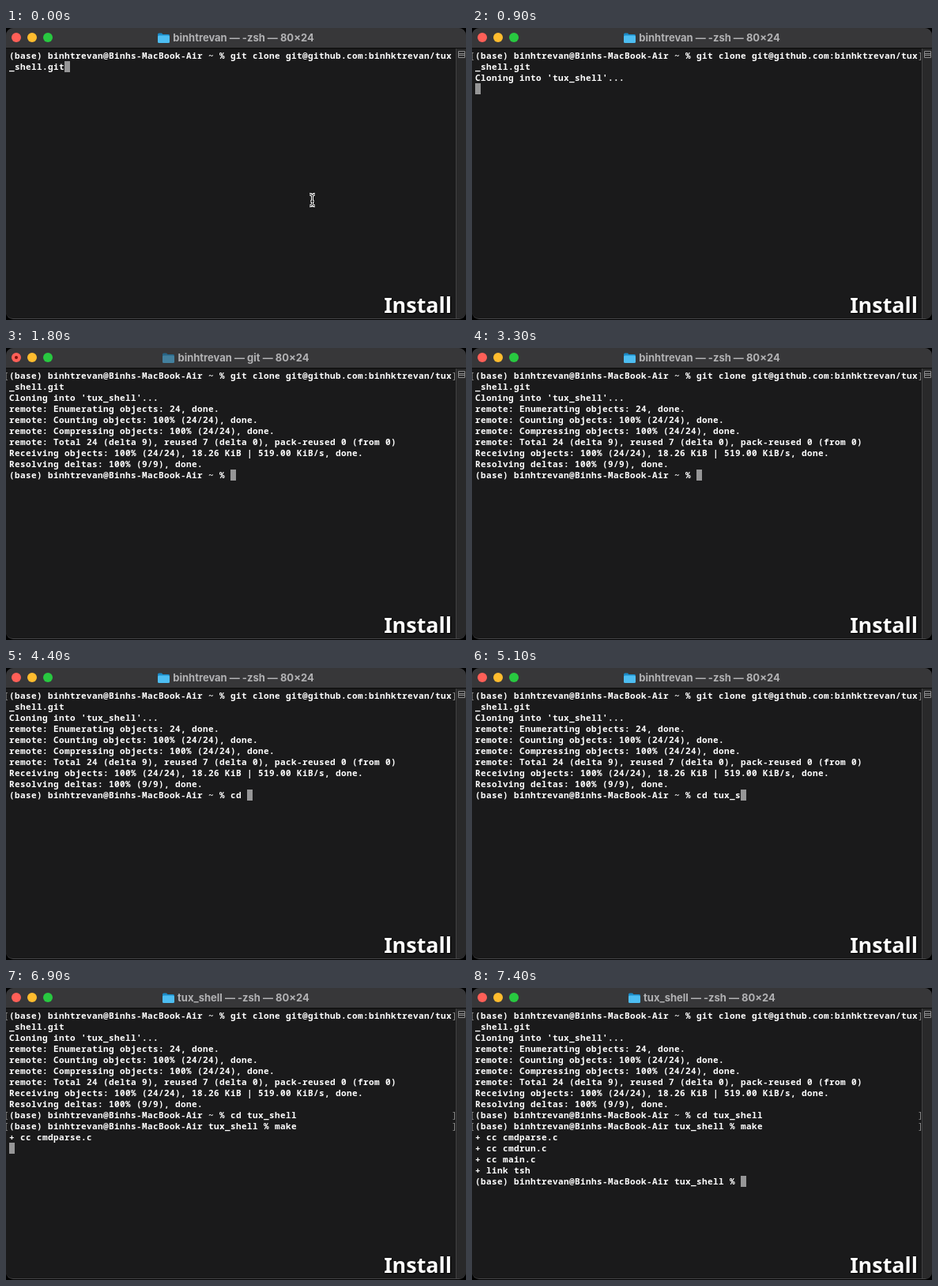
An HTML page that plays this animation: 582 px wide and 370 px high, repeating every 8 s.

```html
<!DOCTYPE html>
<html lang="en">
<head>
<meta charset="utf-8">
<title>Terminal install</title>
<style>
  html, body { margin: 0; width: 100%; height: 100%; overflow: hidden; background: #000; }
  #stage { position: relative; width: 582px; height: 370px; overflow: hidden; }
  #stage > * { position: absolute; }
  #window { left: 0; top: 0; width: 582px; height: 369px; box-sizing: border-box; overflow: hidden;
    background: #1a1a1b; border-radius: 9px; border-bottom: 1px solid #464648; }
  #bar { width: 100%; height: 25px; background: #373739; border-bottom: 1px solid #0c0c0c; }
  #scroll { position: absolute; left: 569px; top: 26px; width: 13px; height: 343px; box-sizing: border-box;
    background: #29292a; border-left: 1px solid #414142; }
  #title { left: 67px; right: 67px; top: 0; height: 24px; display: flex; align-items: center;
    justify-content: safe center; gap: 4px; white-space: nowrap; color: #b2b2b4;
    font: 700 13px/24px Inter, sans-serif; }
  #title svg { flex: none; }
  #screen { left: 4px; top: 28px; margin: 0; color: #fff; letter-spacing: .4px;
    font: 600 11px/14px "Noto Sans Mono", monospace; font-variant-ligatures: none; }
  #screen div { position: relative; height: 14px; }
  .mark { position: absolute; color: #8f8f8f; font-weight: 400; }
  #cursor { width: 7px; height: 14px; background: #969697; }
  #caption { right: 18px; bottom: 6px; color: #fff; line-height: 26px; white-space: nowrap;
    font-family: "Noto Sans", "Open Sans", sans-serif; font-size: 36px; font-weight: 900;
    font-stretch: extra-condensed; text-shadow: 0 0 2px #000, 1px 1px 1px #000; }
</style>
</head>
<body>
<div id="stage">
  <div id="window"><div id="bar"></div><div id="scroll"></div></div>
  <svg width="582" height="370">
    <circle cx="13" cy="12" r="6" fill="#ff5f57"/>
    <circle id="busy" cx="13" cy="12" r="2" fill="#7e120c"/>
    <circle cx="33" cy="12" r="6" fill="#febc2e"/>
    <circle cx="53" cy="12" r="6" fill="#28c840"/>
    <path d="M572.5 29.5h8v8h-8zM573 32.5h7M573 34.5h7" fill="none" stroke="#8b8b8c"/>
  </svg>
  <div id="title">
    <svg id="folder" width="15" height="13">
      <path d="M0 2Q0 .5 1.5 .5H5L6.5 2H13.5Q15 2 15 3.5V6H0z" fill="#1b8ac6"/>
      <rect y="3.5" width="15" height="9.5" rx="1.5" fill="#4dbdf2"/>
    </svg>
    <span id="name"></span>
  </div>
  <pre id="screen"></pre>
  <div id="cursor"></div>
  <svg id="pointer" width="582" height="370" fill="none">
    <g id="beam"><path id="beamPath" d="M384 210.5q3.5 0 3.5 3v9q0 3-3.5 3M391 210.5q-3.5 0-3.5 3v9q0 3 3.5 3M385.5 219.5h4" stroke="#fff" stroke-width="3"/>
    <use href="#beamPath"/></g>
    <path d="M384 210.5q3.5 0 3.5 3v9q0 3-3.5 3M391 210.5q-3.5 0-3.5 3v9q0 3 3.5 3M385.5 219.5h4" stroke="#111"/>
  </svg>
  <div id="caption">Install</div>
</div>
<script>
const LOOP = 8000, COLUMN = 7, ROW = 14;
const $ = id => document.getElementById(id);
const user = 'binhtrevan';
const repo = 'git@github.com:binhktrevan/tux_shell.git';
const prompt = dir => `(base) ${user}@Binhs-MacBook-Air ${dir} % `;

// Each entry is the time at which one more character is visible.
const cdKeys = [4100, 4200, 4400, 4500, 4500, 4700, 4800, 5100, 5200, 5300, 5500, 5700];
const makeKeys = [6300, 6400, 6500, 6600];
const typed = (text, keys, t) => text.slice(0, keys.filter(k => k <= t).length);

const output = [
  [900, "Cloning into 'tux_shell'..."],
  [1700, 'remote: Enumerating objects: 24, done.'],
  [1700, 'remote: Counting objects: 100% (24/24), done.'],
  [1700, 'remote: Compressing objects: 100% (24/24), done.'],
  [1700, 'remote: Total 24 (delta 9), reused 7 (delta 0), pack-reused 0 (from 0)'],
  [1800, 'Receiving objects: 100% (24/24), 18.26 KiB | 519.00 KiB/s, done.'],
  [1800, 'Resolving deltas: 100% (9/9), done.'],
  [1800, t => prompt('~') + typed('cd tux_shell', cdKeys, t), 5900],
  [5900, t => prompt('tux_shell') + typed('make', makeKeys, t), 6900],
  [6900, '+ cc cmdparse.c'],
  [7000, '+ cc cmdrun.c'],
  [7100, '+ cc main.c'],
  [7200, '+ link tsh'],
  [7300, () => prompt('tux_shell')]
];

// start, title, whether a command is running
const titles = [
  [0, `${user} — -zsh — 80×24`, false],
  [1000, `${user} — ssh ◂ git clone ${repo} — 80…`, true],
  [1800, `${user} — git — 80×24`, true],
  [1900, `${user} — -zsh — 80×24`, false],
  [5900, 'tux_shell — -zsh — 80×24', false],
  [7000, 'tux_shell — make — 80×24', true],
  [7300, 'tux_shell — -zsh — 80×24', false]
];

function screenLines(t) {
  const command = prompt('~') + 'git clone ' + repo;
  const lines = [
    { text: command.slice(0, 80), marked: t >= 900 },
    { text: command.slice(80) }
  ];
  for (const [start, text, entered = Infinity] of output) {
    if (t >= start) lines.push({ text: typeof text === 'function' ? text(t) : text, marked: t >= entered });
  }
  return lines;
}

function lineHtml({ text, marked }) {
  const mark = (char, column) => `<span class="mark" style="left:${column * COLUMN}px">${char}</span>`;
  return `<div>${marked ? mark('[', -1) + mark(']', 80) : ''}${text}</div>`;
}

function waitingAtLineEnd(t) {
  return t < 900 || (t >= 1800 && t < 6900) || t >= 7300;
}

function draw(t) {
  const lines = screenLines(t);
  const atEnd = waitingAtLineEnd(t);
  const row = atEnd ? lines.length - 1 : lines.length;
  const column = atEnd ? lines[row].text.length : 0;
  $('screen').innerHTML = lines.map(lineHtml).join('');
  $('cursor').style.left = 4 + column * COLUMN + 'px';
  $('cursor').style.top = 28 + row * ROW + 'px';

  const [, title, running] = titles.filter(([start]) => start <= t).pop();
  $('name').textContent = title;
  $('folder').style.opacity = running ? .55 : 1;
  $('busy').style.display = running ? '' : 'none';
  $('pointer').style.display = t < 900 ? '' : 'none';
}

// Keep the caption inside its corner whichever condensed face is available.
$('caption').style.fontSize = 36 * Math.min(1, 86 / $('caption').offsetWidth) + 'px';

function frame() {
  draw(performance.now() % LOOP);
  requestAnimationFrame(frame);
}
frame();
</script>
</body>
</html>
```
